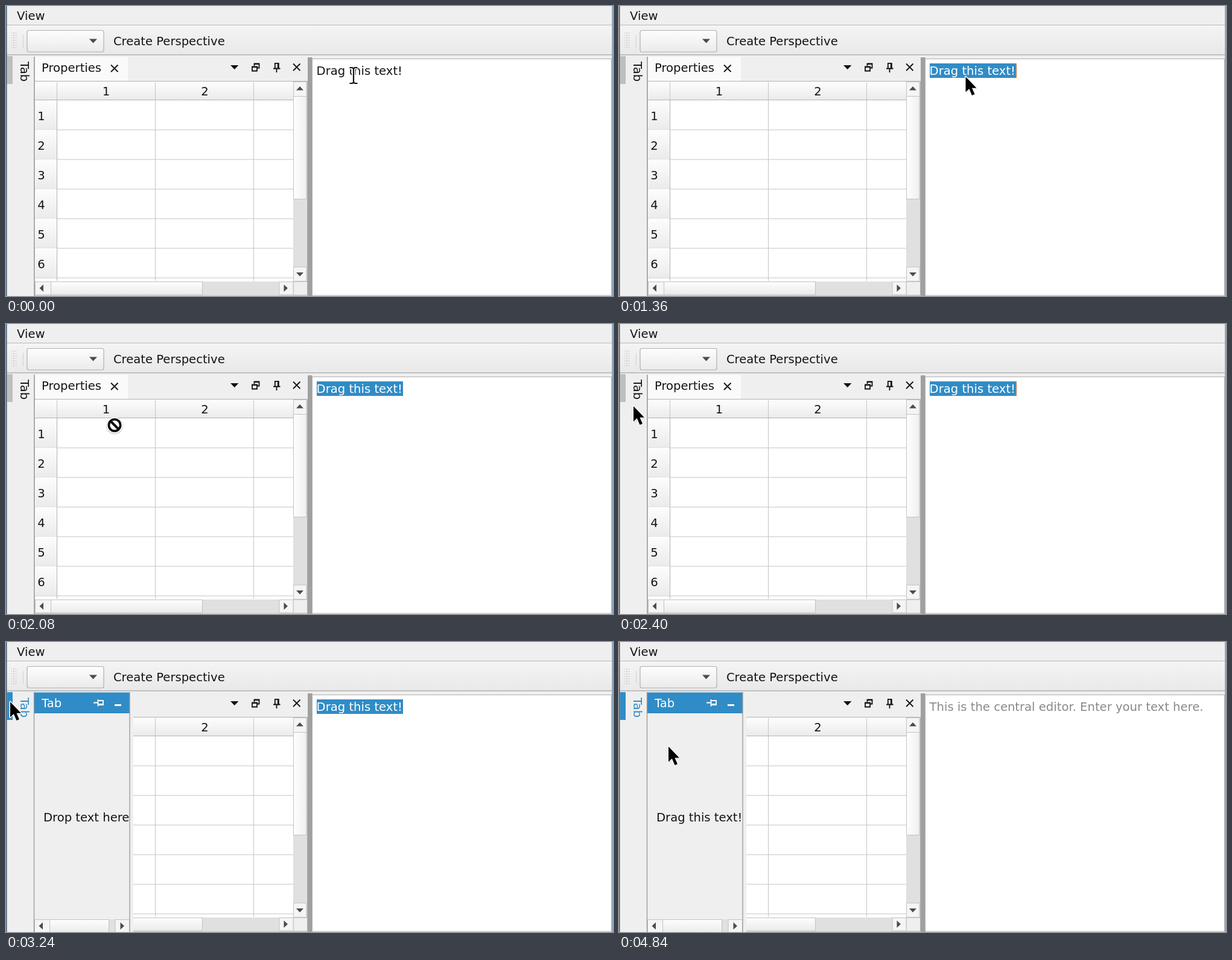
An HTML page for the animation above (5100 ms loop, 1006 by 480 pixels).

```html
<!DOCTYPE html>
<html lang="en">
<head>
<meta charset="utf-8">
<title>Drag and drop</title>
<style>
  html, body { margin: 0; width: 100%; height: 100%; overflow: hidden; background: #efefef; }
  svg { display: block; width: 100%; height: 100%; }
  text { font: 19.6px "DejaVu Sans", Verdana, sans-serif; fill: #141414; white-space: pre; }
  .mid { text-anchor: middle; }
  .white { fill: #fff; }
  .btn { fill: #f5f5f5; stroke: #c2c2c2; }
  .groove { fill: #e0e0e0; }
  .arrow { fill: #4c4c4c; }
  .icon { fill: none; stroke: #111; stroke-width: 1.8; }
  .line { fill: none; stroke: #b9b9b9; }
  .blue { fill: #308cc6; }
</style>
</head>
<body>
<svg viewBox="0 0 1006 480" preserveAspectRatio="none">
  <defs>
    <linearGradient id="bar" x2="0" y2="1"><stop stop-color="#f4f4f4"/><stop offset="1" stop-color="#e9e9e9"/></linearGradient>
    <linearGradient id="box" x2="0" y2="1"><stop stop-color="#fdfdfd"/><stop offset="1" stop-color="#ebebeb"/></linearGradient>
    <linearGradient id="thumb"><stop stop-color="#fefefe"/><stop offset="1" stop-color="#f0f0f0"/></linearGradient>
    <pattern id="dots" width="4" height="4" patternUnits="userSpaceOnUse"><rect width="1.6" height="1.6" fill="#bcbcbc"/></pattern>
    <clipPath id="selClip"><rect id="selHole" y="95" height="24"/></clipPath>
    <clipPath id="panelClip"><rect x="48" y="118" width="156.5" height="340"/></clipPath>
  </defs>

  <!-- menu and toolbar -->
  <rect width="1006" height="480" fill="#efefef"/>
  <text x="18" y="23">View</text>
  <rect y="32" width="1006" height="48" fill="url(#bar)"/>
  <path class="line" d="M0 31.5H1006" stroke="#cfcfcf"/>
  <path class="line" d="M0 80.7H1006" style="stroke:#b2b2b2;stroke-width:1.4"/>
  <rect x="9" y="44" width="8" height="27" fill="url(#dots)"/>
  <path class="line" d="M28.5 48V69" style="stroke:#d2d2d2"/>
  <rect x="35" y="40.5" width="127" height="35.5" rx="3" fill="url(#box)" stroke="#b0b0b0" stroke-width="1.2"/>
  <path class="arrow" d="M138 54.5h13l-6.5 7z"/>
  <text x="177.9" y="65">Create Perspective</text>

  <!-- side bar -->
  <rect id="strip" x="1.5" y="83" width="9.5" height="46"/>
  <text id="sideText" transform="translate(23.5 92) rotate(90)">Tab</text>

  <!-- properties dock -->
  <rect x="48" y="84" width="154" height="40" fill="#fafafa"/>
  <text x="59" y="109">Properties</text>
  <path class="icon" d="M174 97.5l11.5 11.5m0-11.5l-11.5 11.5"/>
  <path d="M372 98h13.4l-6.7 7z" fill="#111"/>
  <path class="icon" d="M411.5 99V95.5h8v7h-3M408 100.5h8v7h-8z"/>
  <path class="icon" d="M411 96h9M408 101h8.500" stroke-width="3"/>
  <path class="icon" d="M445 94.800h7.500M445.800 95v8M443 103.500h11.500M448.500 104v6"/>
  <path class="icon" d="M451.300 95v8" style="stroke-width:2.800"/>
  <path class="icon" d="M476 95.500l11.500 11.500m0-11.500l-11.500 11.500"/>

  <rect x="48" y="125" width="452" height="354" fill="#fff"/>
  <rect x="49" y="126" width="427" height="29" fill="url(#box)"/>
  <g id="rows"></g>
  <text class="mid" x="166" y="148.300">1</text>
  <text class="mid" x="329.500" y="148.300">2</text>
  <path class="line" d="M84.500 126V155M247.500 126V455M410.500 126V455" style="stroke:#c4c4c4"/>
  <path class="line" d="M48 155.500H476M84.500 155V455" style="stroke:#b4b4b4"/>

  <!-- table scroll bars -->
  <rect class="groove" x="476" y="126" width="23" height="330"/>
  <rect class="btn" x="476.500" y="125.500" width="21.500" height="24"/>
  <rect x="476.500" y="149.500" width="21.500" height="170" fill="url(#thumb)" stroke="#c2c2c2"/>
  <rect class="btn" x="476.500" y="432" width="21.500" height="23.500"/>
  <path class="arrow" d="M481 139.500h12l-6-6.500zM481 441h12l-6 6.500z"/>
  <rect class="groove" x="48" y="456" width="428" height="22"/>
  <rect class="btn" x="48.500" y="456.500" width="26" height="21.500"/>
  <rect x="74.500" y="456.500" width="251" height="21.500" fill="url(#box)" stroke="#c2c2c2"/>
  <rect class="btn" x="453" y="456.500" width="23" height="21.500"/>
  <path class="arrow" d="M62 461v12l-6.500-6zM460.500 461v12l6.500-6z"/>
  <rect x="476.500" y="456.500" width="23" height="22" fill="#efefef" stroke="#c9c9c9"/>
  <path class="line" d="M48 124.500H499.500V479H47.500" style="stroke:#b0b0b0"/>
  <path class="line" d="M47 84V480" style="stroke:#a9a9a9;stroke-width:2"/>

  <!-- editor -->
  <rect x="500" y="85" width="7.500" height="395" fill="#a0a0a0"/>
  <rect x="507.500" y="87.500" width="496" height="391.500" fill="#fff" stroke="#b0b0b0"/>
  <g id="typed">
    <text x="514.600" y="114">Drag this text!</text>
    <g clip-path="url(#selClip)">
      <rect class="blue" x="514" y="95" width="146" height="24"/>
      <text class="white" x="514.600" y="114">Drag this text!</text>
    </g>
  </g>
  <text id="hint" x="514.600" y="114" style="fill:#898989">This is the central editor. Enter your text here.</text>
  <rect id="caret" y="95" width="1.500" height="24"/>

  <!-- slide-out panel -->
  <g id="panel">
    <rect x="46" y="83" width="165" height="397" fill="#efefef"/>
    <rect class="blue" x="47" y="83.500" width="158" height="34.500"/>
    <text class="white" x="59" y="108">Tab</text>
    <path class="icon" d="M145 100.500h7M152.500 95v11.500M153 97h8v7h-8M153 103h8" style="stroke:#fff"/>
    <rect class="white" x="180" y="103" width="11" height="3"/>
    <g clip-path="url(#panelClip)"><text id="label" x="62" y="297"></text></g>
    <rect class="groove" x="48" y="459" width="157" height="21"/>
    <rect class="btn" x="47.500" y="459.500" width="25" height="22"/>
    <rect x="72.500" y="459.500" width="98" height="22" fill="url(#box)" stroke="#c2c2c2"/>
    <rect class="btn" x="181" y="459.500" width="23.500" height="22"/>
    <path class="arrow" d="M61 464v12l-6.500-6zM189.500 464v12l6.500-6z"/>
    <path class="line" d="M46.500 83V480M205 83V480" style="stroke:#999;stroke-width:1.300"/>
  </g>

  <!-- window edges -->
  <rect width="1.500" height="480" fill="#44607c"/>
  <rect x="1004" width="2" height="480" fill="#8fa9bf"/>

  <!-- pointers -->
  <g id="pointer">
    <g id="beam" fill="none">
      <path id="beamPath" d="M-6.500-13H-3Q0-13 0-10Q0-13 3-13H6.500M0-11V11M-6.500 13H-3Q0 13 0 10Q0 13 3 13H6.500" stroke="#fff" stroke-width="5"/>
      <use href="#beamPath"/>
      <path d="M-6.500-13H-3Q0-13 0-10Q0-13 3-13H6.500M0-11V11M-6.500 13H-3Q0 13 0 10Q0 13 3 13H6.500" stroke="#111" stroke-width="2.200"/>
    </g>
    <g id="hand">
      <path d="M1 2V28L7 22L11.500 32.500L16 30.500L12 21H20Z" fill="#000" opacity=".15"/>
      <path d="M0 0V25.500L5.800 20L10.500 31L15 29L10.500 18.800H18Z" stroke="#fff" stroke-width="3" stroke-linejoin="round" paint-order="stroke"/>
    </g>
    <g id="deny" fill="none">
      <circle cy="1" r="14" fill="#000" opacity=".18"/>
      <circle r="13.200" fill="#fff"/>
      <circle r="9.600" stroke="#111" stroke-width="3.800"/>
      <path d="M-6.500-6.500L6.500 6.500" stroke="#111" stroke-width="4"/>
    </g>
  </g>
</svg>
<script>
const LOOP = 5100, STEP = 40;
const OPEN = 2960, DROP = 4240, DRAG = 1320;
const $ = id => document.getElementById(id);
const show = (id, on) => { $(id).style.display = on ? '' : 'none'; };

let rows = '';
for (let i = 0; i < 6; i++) {
  const y = 156 + i * 49;
  rows += `<rect x="49" y="${y}" width="35" height="48" fill="url(#box)"/>
    <path class="line" d="M48 ${y + 49}H476" style="stroke:#c4c4c4"/>
    <text class="mid" x="58.500" y="${y + 33}">${i + 1}</text>`;
}
$('rows').innerHTML = rows;

// pointer path: time, x, y
const path = [
  [0, 576, 115], [320, 576, 115], [520, 577, 112.5], [760, 577, 112.5],
  [1000, 577, 116], [1320, 577, 116], [1520, 535, 132], [1720, 433, 160],
  [1840, 382, 172], [2080, 180, 167.5], [2240, 76, 158], [2400, 24, 136],
  [2640, 11, 110], [2880, 7, 99], [3300, 7, 99], [3520, 14, 101],
  [3800, 92, 175], [4040, 90, 184], [4240, 90, 184], [4520, 82, 173], [LOOP, 82, 173]
];

const slope = (i, k) => (path[i + 1][k] - path[i][k]) / (path[i + 1][0] - path[i][0]);

// monotone tangent, so the pointer never overshoots a point
function tangent(i, k) {
  if (i === 0 || i === path.length - 1) return 0;
  const a = slope(i - 1, k), b = slope(i, k);
  return a * b > 0 ? 2 * a * b / (a + b) : 0;
}

function along(t, k) {
  let i = 0;
  while (i < path.length - 2 && t >= path[i + 1][0]) i++;
  const d = path[i + 1][0] - path[i][0], u = (t - path[i][0]) / d, v = 1 - u;
  return path[i][k] * (1 + 2 * u) * v * v + path[i + 1][k] * (3 - 2 * u) * u * u
    + d * u * v * (tangent(i, k) * v - tangent(i + 1, k) * u);
}

function selection(t) {
  if (t < 360) return [515, 0];
  return t < 440 ? [568.4, 35.8] : [515, 143];
}

function draw(t) {
  const open = t >= OPEN, dropped = t >= DROP;
  show('panel', open);
  $('strip').setAttribute('fill', open ? '#308cc6' : '#bebebe');
  $('sideText').style.fill = open ? '#308cc6' : '#141414';
  $('label').textContent = dropped ? 'Drag this text!' : 'Drop text here';

  show('typed', !dropped);
  show('hint', dropped);
  const [sx, sw] = selection(t);
  $('selHole').setAttribute('x', sx);
  $('selHole').setAttribute('width', sw);

  const blink = (t + 760) % 1040 < 520;
  show('caret', dropped ? t >= 4440 && t < 4840 : t >= 440 && blink);
  $('caret').setAttribute('x', dropped ? 514 : 657.7);
  $('caret').setAttribute('fill', dropped ? '#111' : '#cf8a5a');

  const x = along(t, 1), y = along(t, 2);
  const beam = t < DRAG, deny = !beam && !open && x > 46 && x < 508;
  show('beam', beam);
  show('deny', deny);
  show('hand', !beam && !deny);
  $('pointer').setAttribute('transform', `translate(${x.toFixed(1)} ${y.toFixed(1)})`);
}

const start = performance.now();
function tick() {
  const t = (performance.now() - start) % LOOP;
  draw(Math.floor(t / STEP) * STEP);
  requestAnimationFrame(tick);
}
tick();
</script>
</body>
</html>
```
